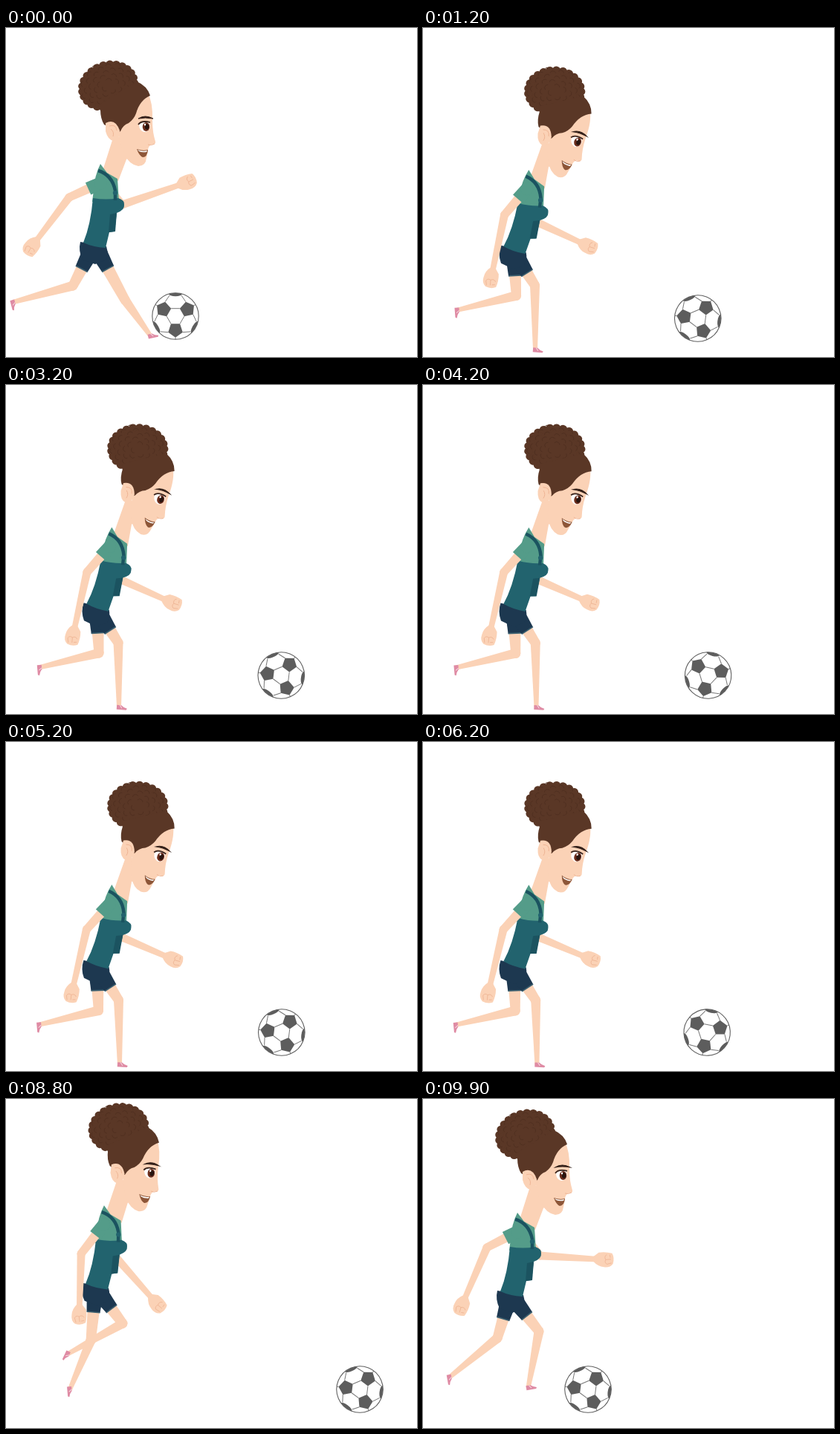
Animation, 553 px wide and 443 px high, one loop 10 s. Source, as an HTML page with a canvas:

```html
<!DOCTYPE html>
<html>
<head>
<meta charset="utf-8">
<title>Runner with ball</title>
<style>
html, body { margin: 0; width: 100%; height: 100%; overflow: hidden; background: #fff; }
canvas { display: block; }
</style>
</head>
<body>
<canvas id="stage" width="553" height="443"></canvas>
<script>
const ctx = document.getElementById('stage').getContext('2d');
const SKIN = '#fbd2b6', SKIN_LINE = '#eeb494', HAIR = '#5a3726', HAIR_DARK = '#4f2f20';
const SHIRT = '#549c89', BIB = '#22636e', BIB_DARK = '#1b5360', SHORTS = '#1d3850', SHOE = '#df8ba4';
const LOOP = 10000, TICK = 100, STRIDE = 1001, HALF = STRIDE / 2, KICK = 2 * STRIDE;
const RAD = Math.PI / 180;

const stepTimes = [0, 98, 197, 292, 391];
const strideTimes = stepTimes.concat(stepTimes.map(t => t + HALF));

// pelvis x, y, lean; bun x, y, head tilt
const bodyKeys = [
  [118, 292, 0, 138, 77, 0],
  [120, 304, 2, 158, 90, 9],
  [122, 299, 6, 178, 85, 18.5],
  [121, 252, 1, 152, 38, 7],
  [118, 262, 0, 138, 47, 0]
];
// elbow, hand
const armKeys = [
  [85, 228, 35, 294], [92, 246, 52, 326], [109, 252, 90, 337], [148, 213, 203, 275], [157, 211, 243, 216],
  [156, 238, 243, 208], [156, 256, 240, 250], [152, 261, 223, 293], [101, 208, 98, 290], [86, 200, 52, 278]
];
// knee, ankle, foot angle
const legKeys = [
  [160, 366, 194, 414, -12], [160, 374, 180, 435, 0], [151, 347, 152, 433, 4], [114, 325, 86, 390, 85],
  [100, 322, 36, 374, 80], [90, 347, 10, 369, 75], [106, 359, 17, 384, 80], [125, 361, 46, 380, 85],
  [157, 302, 84, 343, 115], [156, 313, 142, 388, -10]
];
const ballTimes = [0, 100, 198, 300, 396, 497, 594, 792, 1096, 1199, 1500, 1892];
const ballKeys = [228, 310, 385, 450, 495, 511, 505, 476, 398, 370, 292, 222]
  .map((x, i) => [x, i ? 391 : 388]);

// periodic cubic through uneven keys
function sample(rows, times, period, t) {
  const n = rows.length;
  t = ((t % period) + period) % period;
  let i = n - 1;
  while (times[i] > t) i--;
  const at = k => times[(k + n) % n] + Math.floor(k / n) * period;
  const row = k => rows[(k + n) % n];
  const span = at(i + 1) - at(i), u = (t - at(i)) / span;
  return row(i).map((a, c) => {
    const slope = k => (row(k + 1)[c] - row(k - 1)[c]) / (at(k + 1) - at(k - 1)) * span;
    const b = row(i + 1)[c], m = slope(i), q = slope(i + 1);
    return a + m * u + (3 * (b - a) - 2 * m - q) * u * u + (2 * (a - b) + m + q) * u * u * u;
  });
}

function poly(points, fill) {
  ctx.beginPath();
  points.forEach(p => ctx.lineTo(p[0], p[1]));
  ctx.closePath();
  ctx.fillStyle = fill;
  ctx.fill();
}

function shape(d, fill, stroke, width) {
  const path = new Path2D(d);
  if (fill) { ctx.fillStyle = fill; ctx.fill(path); }
  if (stroke) { ctx.strokeStyle = stroke; ctx.lineWidth = width || 1; ctx.stroke(path); }
}

function oval(x, y, rx, ry, fill, turn) {
  ctx.beginPath();
  ctx.ellipse(x, y, rx, ry, turn || 0, 0, 7);
  ctx.fillStyle = fill;
  ctx.fill();
}

function within(x, y, deg, draw) {
  ctx.save();
  ctx.translate(x, y);
  ctx.rotate(deg * RAD);
  draw();
  ctx.restore();
}

function place(x, y, deg, dx, dy) {
  const c = Math.cos(deg * RAD), s = Math.sin(deg * RAD);
  return [x + dx * c - dy * s, y + dx * s + dy * c];
}

function toward(p, q, d) {
  const k = d / Math.hypot(q[0] - p[0], q[1] - p[1]);
  return [p[0] + (q[0] - p[0]) * k, p[1] + (q[1] - p[1]) * k];
}

function taper(p, q, w1, w2, fill, flat) {
  const a = Math.atan2(q[1] - p[1], q[0] - p[0]);
  const nx = -Math.sin(a) / 2, ny = Math.cos(a) / 2;
  poly([[p[0] + nx * w1, p[1] + ny * w1], [q[0] + nx * w2, q[1] + ny * w2],
    [q[0] - nx * w2, q[1] - ny * w2], [p[0] - nx * w1, p[1] - ny * w1]], fill);
  oval(p[0], p[1], w1 / 2, w1 / 2, fill);
  if (!flat) oval(q[0], q[1], w2 / 2, w2 / 2, fill);
}

function arm(body, t, dx) {
  const [ex, ey, hx, hy] = sample(armKeys, strideTimes, STRIDE, t);
  const shoulder = place(body[0], body[1], body[2], dx, -83);
  const elbow = [ex, ey], hand = [hx, hy];
  taper(shoulder, elbow, 13, 11, SKIN);
  taper(elbow, hand, 11, 7, SKIN);
  within(hx, hy, Math.atan2(hy - ey, hx - ex) / RAD, () => {
    shape('M-14-3L-7-9Q2-11 11-9Q15-3 13 5Q9 11 1 10Q-7 10-14 3Z', SKIN);
    shape('M4-7Q0-4 3 0L10-1M3 0Q1 4 5 6L11 4M8-7L9-3', null, SKIN_LINE, 0.8);
  });
  taper(shoulder, toward(shoulder, elbow, 18), 17, 18, SHIRT, true);
}

function leg(body, t) {
  const [kx, ky, fx, fy, turn] = sample(legKeys, strideTimes, STRIDE, t);
  const shift = Math.max(-8, Math.min(8, (kx - body[0]) / 5));
  const hip = [body[0] + shift, body[1] + 12], knee = [kx, ky], ankle = [fx, fy];
  taper(hip, knee, 18, 13, SKIN);
  taper(knee, ankle, 13, 6, SKIN);
  within(fx, fy, turn, () => {
    shape('M-3-2L3-2Q6 1 11 2L10 4L-3 4Z', SHOE);
    shape('M1-2L4 2', null, '#f7d9df', 1);
  });
  const cuff = toward(hip, knee, 23);
  taper(hip, cuff, 22, 18, SHORTS, true);
  const a = Math.atan2(ky - hip[1], kx - hip[0]);
  const nx = -Math.sin(a) * 9, ny = Math.cos(a) * 9;
  ctx.beginPath();
  ctx.moveTo(cuff[0] - nx, cuff[1] - ny);
  ctx.lineTo(cuff[0] + nx, cuff[1] + ny);
  ctx.strokeStyle = '#3b6070';
  ctx.lineWidth = 1.6;
  ctx.stroke();
}

function neck(b) {
  const top = (x, y) => place(b[3], b[4], b[5], x - 138, y - 77);
  const base = (x, y) => place(b[0], b[1], b[2], x - 118, y - 292);
  poly([top(144, 148), top(158, 146), top(165, 174), top(162, 177),
    base(151, 206), base(138, 206), base(131, 189)], SKIN);
}

function torso(b) {
  within(b[0], b[1], b[2], () => {
    ctx.translate(-118, -292);
    shape('M100 288L135 294Q138 303 134 312L120 318L103 312Q97 300 100 288Z', SHORTS);
    shape('M127 183L136 195L150 203L152 234L116 234L118 218Q119 199 127 183Z', SHIRT);
    shape('M117 229Q135 232 151 229Q160 232 159 238Q160 245 149 249L146 274L139 275L134 296Q117 295 104 289Q114 265 117 229Z', BIB);
    shape('M140 251L149 249L147 274L138 275Z', BIB_DARK);
    shape('M124 192Q143 198 147 219L147 232', null, BIB_DARK, 4.5);
    oval(147, 222, 3.2, 3, BIB);
  });
}

function bun() {
  const cx = 137.5, cy = 78;
  oval(cx, cy, 36.5, 30, HAIR, -0.12);
  for (let i = 0; i < 25; i++) {
    const a = i * 2 * Math.PI / 25;
    oval(cx + 35 * Math.cos(a), cy - 4 * Math.cos(a) + 29 * Math.sin(a), 5.6, 5.2, HAIR);
  }
  ctx.strokeStyle = HAIR_DARK;
  ctx.lineWidth = 0.8;
  for (let i = 1; i < 46; i++) {
    const a = i * 2.4, r = Math.sqrt(i / 46);
    ctx.beginPath();
    ctx.arc(cx + 36 * r * Math.cos(a), cy + 29 * r * Math.sin(a), 4, a - 1.2, a + 1.2);
    ctx.stroke();
  }
}

function head(b) {
  within(b[3], b[4], b[5], () => {
    ctx.translate(-138, -77);
    shape('M190 86Q198 100 197 125Q197 140 201 153Q202 157 195 157Q191 160 191 165L189 175Q188 186 178 186Q166 184 159 170Q153 158 151 138L156 118Z', SKIN);
    bun();
    shape('M124 104L127 110Q127 122 132 130L151 141L154 139Q157 131 165 128Q172 123 175 115Q180 97 194 91Q190 78 176 72Q156 84 124 104Z', HAIR);
    shape('M134 128Q147 121 153 138Q153 152 145 152Q137 151 134 139Z', SKIN);
    shape('M139 132Q148 129 149 138M141 136Q146 140 144 146', null, SKIN_LINE, 0.9);
    shape('M178 122Q187 116 198 122Q187 120 178 122Z', '#332019', '#332019', 1);
    shape('M179 130Q183 125 192 126L194 132Q193 140 186 140Q179 138 179 130Z', '#fff');
    oval(188.5, 133, 4.8, 6, '#6b2d1c');
    oval(189.5, 133, 2.7, 3.8, '#281510');
    oval(187, 130, 1.2, 1.5, '#fff');
    shape('M178 130Q182 124 194 127', null, '#38221a', 1.8);
    shape('M191 157Q195 159 200 156', null, SKIN_LINE, 0.9);
    shape('M176 163Q184 166 191 164Q190 174 184 174Q179 172 176 163Z', '#8d5638');
    shape('M177 164Q184 167 190 165L189 167Q183 168 179 166Z', '#fff');
  });
}

function ball(t) {
  const [x, y] = sample(ballKeys, ballTimes, KICK, t);
  const rest = 337;
  const turn = t < 497 ? rest * t / 497 : rest + (360 - rest) * Math.max(0, t - 1892) / (KICK - 1892);
  within(x, y, turn, () => {
    const dir = (r, deg) => [r * Math.cos(deg * RAD), r * Math.sin(deg * RAD)];
    const line = (p, q) => { ctx.beginPath(); ctx.moveTo(...p); ctx.lineTo(...q); ctx.stroke(); };
    ctx.beginPath();
    ctx.arc(0, 0, 31.2, 0, 7);
    ctx.fillStyle = '#fff';
    ctx.fill();
    ctx.save();
    ctx.clip();
    ctx.strokeStyle = '#777';
    ctx.lineWidth = 1;
    for (const a of [90, 210, 330]) {
      const corner = (base, deg) => {
        const c = dir(18.5, base), v = dir(10.3, base + deg);
        return [c[0] + v[0], c[1] + v[1]];
      };
      line(corner(a, 144), corner(a + 120, -144));
      line(corner(a, 0), dir(32, a));
      line(corner(a, 72), dir(29, a + 44));
      line(corner(a, -72), dir(29, a - 44));
      poly([0, 72, 144, 216, 288].map(d => corner(a, d)), '#5d5d5d');
      const e = dir(30, a + 60);
      oval(e[0], e[1], 3.2, 9, '#5d5d5d', (a + 60) * RAD);
    }
    ctx.restore();
    ctx.beginPath();
    ctx.arc(0, 0, 31.2, 0, 7);
    ctx.strokeStyle = '#606060';
    ctx.lineWidth = 1.1;
    ctx.stroke();
  });
}

function draw(t) {
  ctx.fillStyle = '#fff';
  ctx.fillRect(0, 0, 553, 443);
  const body = sample(bodyKeys, stepTimes, HALF, t);
  arm(body, t + HALF, 14);
  leg(body, t + HALF);
  leg(body, t);
  neck(body);
  torso(body);
  head(body);
  arm(body, t, 9);
  ball(t % KICK);
}

const start = performance.now();
function frame() {
  const t = (performance.now() - start) % LOOP;
  draw(Math.floor(t / TICK) * TICK);
  requestAnimationFrame(frame);
}
frame();
</script>
</body>
</html>
```
